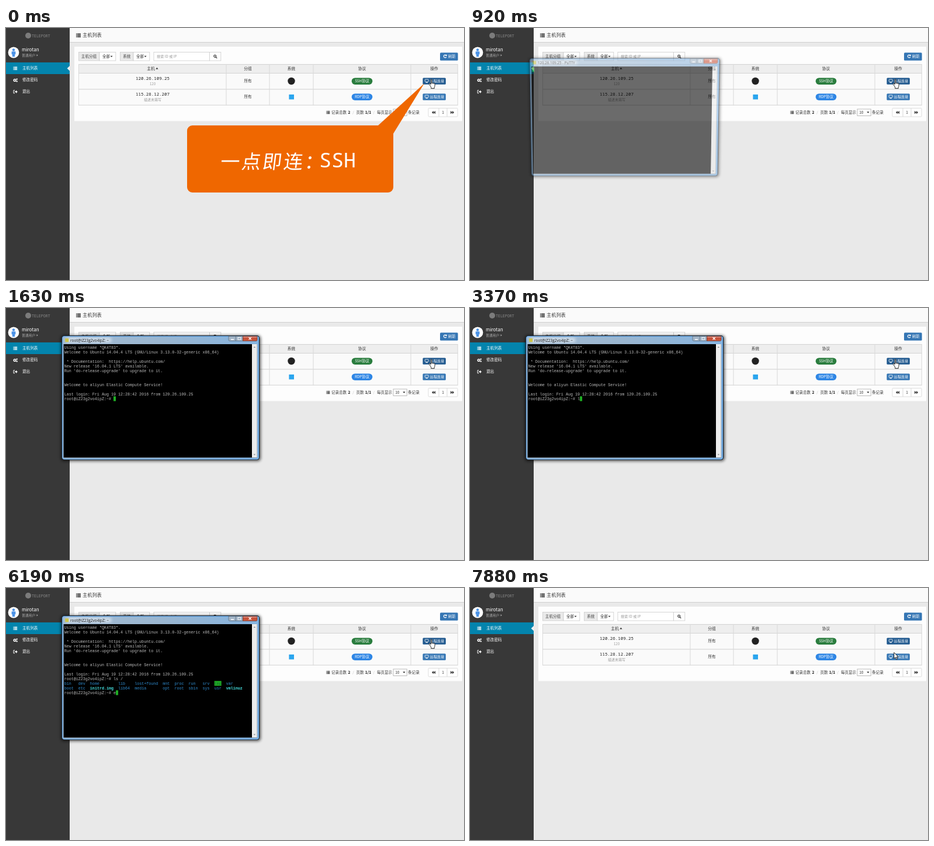
Recreate the animation shown at these times as an HTML page. Size 784 by 432 pixels, loop 8 s.

```html
<!DOCTYPE html>
<html lang="zh">
<head>
<meta charset="utf-8">
<title>Teleport</title>
<style>
html, body { margin: 0; width: 100%; height: 100%; overflow: hidden; background: #e9e9e9; }
svg { position: absolute; inset: 0; width: 100%; height: 100%; }
text { white-space: pre; font-family: "Noto Sans CJK SC", "Noto Sans CJK", "Noto Sans", sans-serif; }
.mono { font-family: "Noto Sans Mono", monospace; }
.term { font-family: "Liberation Mono", monospace; font-size: 6.69px; }
#title { font-family: "Open Sans", sans-serif; }
#win { transform-origin: 33.75% 35.2%; }
</style>
</head>
<body>
<svg id="page" viewBox="0 0 784 432"></svg>
<svg id="win" viewBox="0 0 784 432"></svg>
<svg id="top" viewBox="0 0 784 432"></svg>
<script>
const LOOP = 8000;
const $ = id => document.getElementById(id);
const esc = s => s.replace(/&/g, '&amp;').replace(/</g, '&lt;');

// Shape helpers; y of text is the middle of the line
const box = (x, y, w, h, fill, more = '') =>
  `<rect x="${x}" y="${y}" width="${w}" height="${h}" fill="${fill}" ${more}/>`;
const frame = (x, y, w, h, fill, line, r = 0) =>
  box(x + .5, y + .5, w - 1, h - 1, fill, `stroke="${line}" stroke-width=".8" rx="${r}"`);
const txt = (x, y, size, fill, s, more = '') =>
  `<text x="${x}" y="${y + size * .36}" font-size="${size}" fill="${fill}" ${more}>${esc(s)}</text>`;
const mid = (x, y, size, fill, s, more = '') =>
  txt(x, y, size, fill, s, 'text-anchor="middle" ' + more);
const path = (d, fill, more = '') => `<path d="${d}" fill="${fill}" ${more}/>`;
const line = (d, stroke, w = 1) => path(d, 'none', `stroke="${stroke}" stroke-width="${w}"`);
const dot = (x, y, r, fill) => `<circle cx="${x}" cy="${y}" r="${r}" fill="${fill}"/>`;
const caret = (x, y, fill = '#333') => path(`M${x} ${y}h4l-2 2.3z`, fill);

const listIcon = (x, y, s, fill) => [0, 1, 2, 3].map(i =>
  box(x, y + i * s * .25, s * .2, s * .17, fill) +
  box(x + s * .28, y + i * s * .25, s * .8, s * .17, fill)).join('');

function connectButton(y, fill, id) {
  return box(713.4, y - 5.6, 39.4, 11.4, fill, `rx="1.5" id="${id}"`) +
    frame(716.7, y - 3.4, 7, 5, 'none', '#fff', .6) + box(718.5, y + 2, 3.4, 1, '#fff') +
    txt(725.5, y, 6.2, '#fff', '远程连接', 'font-weight="500"');
}

function sidebar() {
  const item = (y, s) => txt(28, y, 6.6, '#fff', s);
  return box(0, 0, 109, 432, '#383838') +
    dot(38, 13, 5, '#7c7c7c') +
    '<text x="44" y="15.6" font-size="6.6" fill="#8a8a8a" class="mono">TELEPORT</text>' +
    dot(13, 42, 9.4, '#fff') + dot(13, 37.5, 2.2, '#4c93e6') +
    path('M9.6 40.3h6.8v5h-1.2v4h-4.4v-4H9.6z', '#4c93e6') +
    txt(27, 37.2, 8, '#fff', 'mirotan') +
    txt(27, 46.8, 5.8, '#aaa', '普通用户') + path('M52.5 45l2.2 1.8-2.2 1.8z', '#aaa') +
    box(0, 59, 109, 20, '#0384ad') + path('M109 65v8.4l-4.4-4.2z', '#f2f2f2') +
    listIcon(12.5, 66.3, 6.2, '#fff') + item(69, '主机列表') +
    '<circle cx="15" cy="89.5" r="1.8" fill="none" stroke="#fff" stroke-width="1.5"/>' +
    dot(18.6, 87.6, 1.2, '#fff') + dot(18.6, 91.4, 1.2, '#fff') + item(89, '修改密码') +
    line('M15 106.8h-2v5h2', '#fff') + path('M15 108.5h2v-1.8l2.8 2.6-2.8 2.6v-1.8h-2z', '#fff') +
    item(109, '退出');
}

function filters() {
  return frame(124, 41, 36.5, 15.5, '#eaeaea', '#ccc') + mid(142, 48.8, 6.6, '#444', '主机分组') +
    frame(159.5, 41, 28.8, 15.5, '#fff', '#ccc') + txt(165, 48.8, 6.4, '#222', '全部') + caret(178.6, 47.8) +
    frame(195, 41, 23.5, 15.5, '#eaeaea', '#ccc') + mid(206.8, 48.8, 6.6, '#444', '系统') +
    frame(217.5, 41, 28.8, 15.5, '#fff', '#ccc') + txt(223, 48.8, 6.4, '#222', '全部') + caret(236.6, 47.8) +
    frame(252.5, 41, 96.5, 15.5, '#fff', '#ccc') + txt(258, 48.8, 6.2, '#999', '搜索 ID 或 IP') +
    frame(348, 41, 20.3, 15.5, '#fff', '#ccc') +
    '<circle cx="357.7" cy="48.2" r="1.9" fill="none" stroke="#222" stroke-width="1.1"/>' +
    line('M359 49.6l2.2 2.2', '#222', 1.2) +
    box(743, 42.3, 30.6, 13.4, '#3576b4', 'rx="1.5"') +
    line('M753.6 47a2.4 2.4 0 1 0 .2 2.6', '#fff', 1.2) + path('M754.6 45v3h-3z', '#fff') +
    txt(756.8, 49, 6.4, '#fff', '刷新', 'font-weight="500"');
}

function table() {
  const heads = [[248, '主机'], [414, '分组'], [488.5, '系统'], [609.5, '协议'], [733, '操作']];
  const row = (y, ip, note, proto, color) =>
    mid(251, y - 5, 7.43, '#222', ip, 'class="mono"') +
    mid(251, y + 5, 6, '#999', note) + mid(414, y, 6.6, '#333', '所有') +
    box(591.7, y - 5.6, 35.6, 11.6, color, 'rx="5.7"') +
    mid(609.5, y, 6.3, '#fff', proto, 'font-weight="500"');
  return box(124, 62, 649.5, 70.5, '#fafafa') + box(124, 62, 649.5, 15.5, '#eee') +
    heads.map(([x, s]) => mid(x, 69.8, 6.7, '#333', s)).join('') + path('M256.2 70.4h4.4l-2.2-2.6z', '#333') +
    line('M124 62.4H773.5M124 77.6H773.5M124 132.2H773.5', '#d2d2d2') + line('M124 105H773.5', '#dcdcdc', 1.6) +
    line([124.4, 377, 451, 526, 693, 773.2].map(x => `M${x} 62V132.5`).join(''), '#d8d8d8') +
    row(91, '120.26.109.25', '120', 'SSH协议', '#2a7d3e') +
    row(118, '115.28.12.207', '描述未填写', 'RDP协议', '#2e86e5') +
    dot(488.5, 91, 6.2, '#222') + box(484.4, 114, 8.6, 8.4, '#2aa5ee') +
    connectButton(91, '#20598f', 'ssh') + connectButton(118, '#3576b4', 'rdp');
}

function footer() {
  const y = 144.8, ink = '#333';
  const arrows = (x, d) => [0, 3 * d].map(dx => path(`M${x + dx} 142l${3 * d} 2.7l${-3 * d} 2.7z`, ink)).join('');
  return listIcon(548.3, 142.2, 5.6, ink) +
    txt(557, y, 6.5, ink, '记录总数') + txt(585.4, y, 6.5, '#111', '2', 'font-weight="700"') +
    txt(593.2, y, 6.2, '#bbb', '/') + txt(599.6, y, 6.5, ink, '页数') +
    txt(614.8, y, 6.5, '#111', '1/1', 'font-weight="700"') + txt(628.4, y, 6.2, '#bbb', '/') +
    txt(635, y, 6.5, ink, '每页显示') + frame(662.5, 138.5, 24.2, 12.5, '#fff', '#aaa') +
    txt(666.2, y, 6.6, ink, '10') + caret(679.4, 143.6, '#222') + txt(688, y, 6.6, ink, '条记录') +
    frame(722.5, 137, 51, 15.5, '#fff', '#d6d6d6', 1) + line('M741 137.5v14.5M755 137.5v14.5', '#d6d6d6') +
    arrows(735, -1) + arrows(761, 1) + mid(748, y, 6.4, ink, '1');
}

function callout() {
  return '<g id="callout">' +
    path('M319 167H637L716 95 663 181V273a9 9 0 0 1-9 9H319a9 9 0 0 1-9-9V176a9 9 0 0 1 9-9z', '#ef6700') +
    '<text font-size="33" fill="#fff" font-weight="500" letter-spacing="3" transform="translate(366 241) skewX(-7)">一点即连：</text>' +
    '<text x="536" y="239.3" font-size="35" fill="#fff" class="mono">SSH</text></g>';
}

// Terminal
const CW = 4.015, LH = 8, X0 = 99.7, Y0 = 69.6;
const PROMPT = 'root@iZ23g2vo4ipZ:~# ';
const BANNER = [
  'Using username "QK4T83".',
  'Welcome to Ubuntu 14.04.4 LTS (GNU/Linux 3.13.0-32-generic x86_64)', '',
  ' * Documentation:  https://help.ubuntu.com/',
  "New release '16.04.1 LTS' available.",
  "Run 'do-release-upgrade' to upgrade to it.", '', '',
  'Welcome to aliyun Elastic Compute Service!', '',
  'Last login: Fri Aug 19 12:28:42 2016 from 120.26.109.25'];
const COLS = [0, 6, 11, 23, 30, 42, 47, 53, 59, 64, 69];
const DIRS = ['bin dev home lib lost+found mnt proc run srv tmp var',
  'boot etc initrd.img lib64 media opt root sbin sys usr vmlinuz'];

const put = (col, row, s, fill = '#bdbdbd', more = '') =>
  `<text class="term" x="${X0 + col * CW}" y="${Y0 + row * LH}" fill="${fill}" ${more}>${esc(s)}</text>`;
const block = (col, row, n = 1) =>
  box(X0 + col * CW, Y0 + row * LH - 6.2, n * CW, LH + .2, '#1fae24');

const listing = row => DIRS[row].split(' ').map((s, i) => {
  const at = [COLS[i], 12 + row, s];
  if (s === 'tmp') return block(at[0], at[1], 3) + put(...at, '#17642a');
  return /img|vml/.test(s) ? put(...at, '#45e0e0', 'font-weight="700"') : put(...at, '#2f8ccf');
}).join('');

const step = (t, list) => list.reduce((v, [at, next]) => t >= at ? next : v, list[0][1]);
const typed = (t, list) => step(t, [[0, ''], ...list]);

function screen(t) {
  if (t < 1630) return block(0, 0);
  const cmd = typed(t, [[3370, 'l'], [3500, 'ls'], [3780, 'ls /']]);
  let out = BANNER.map((s, i) => put(0, i, s)).join('') + put(0, 11, PROMPT + cmd);
  let cur = [PROMPT.length + cmd.length, 11];
  if (t >= 4340) { out += listing(0); cur = [0, 13]; }
  if (t >= 4490) { out += listing(1); cur = [0, 14]; }
  if (t >= 4640) {
    const last = typed(t, [[6190, 'e'], [6310, 'ex'], [6560, 'exi'], [6830, 'exit']]);
    out += put(0, 14, PROMPT + last);
    cur = [PROMPT.length + last.length, 14];
  }
  return out + block(...cur);
}

function windowFrame() {
  return `<defs><linearGradient id="glass"><stop offset="0" stop-color="#a3bbd2"/>
    <stop offset=".5" stop-color="#9ab6d0"/><stop offset="1" stop-color="#86b4e0"/></linearGradient>
    <linearGradient id="red" x2="0" y2="1"><stop offset="0" stop-color="#e0a093"/>
    <stop offset=".5" stop-color="#c4472f"/><stop offset="1" stop-color="#d0674c"/></linearGradient>
    <filter id="blur" x="-10%" y="-20%" width="120%" height="140%"><feGaussianBlur stdDeviation="2.8"/></filter></defs>` +
    box(94, 47, 342, 215.5, '#000', 'rx="5" opacity=".65" filter="url(#blur)"') +
    box(95.7, 47.7, 337.8, 212.3, 'url(#glass)', 'rx="4" stroke="#17222e" stroke-width="1.2"') +
    box(96.9, 48.9, 335.4, 209.9, 'none', 'rx="3" stroke="#6fb0ee" stroke-width="1.2"') +
    box(104, 51, 76, 8, '#e6eef6', 'opacity=".75" filter="url(#blur)"') +
    box(98.6, 62, 331.2, 194.4, '#000') + box(421, 62, 8.8, 194.4, '#ececec') +
    path('M423.6 68h3.6l-1.8-2z', '#888') + path('M423.6 250.5h3.6l-1.8 2z', '#888') +
    box(101.2, 52.2, 6, 6, '#cfc64a') + txt(110, 55.3, 6.5, '#111', '', 'id="title"') +
    path('M381 48.3h24.5v8.2H383a2 2 0 0 1-2-2z', '#a2b4c6', 'stroke="#55697c" stroke-width=".7"') +
    path('M405.5 48.3H430v6.2a2 2 0 0 1-2 2h-22.5z', 'url(#red)', 'stroke="#6b2a20" stroke-width=".7"') +
    line('M393.3 48.3v8.2', '#55697c', .7) + line('M385 54h5', '#fff', 1.5) +
    frame(396.6, 50, 5.6, 4.8, 'none', '#fff') + line('M415.6 50.2l4.2 4.2m0-4.2l-4.2 4.2', '#fff', 1.3) +
    '<g id="screen"></g>';
}

$('page').innerHTML = box(109, 0, 675, 432, '#e9e9e9') + box(109, 0, 675, 24, '#fafafa') +
  box(109, 24, 675, 1, '#cfcfcf') + sidebar() +
  listIcon(120, 9.2, 7.4, '#333') + txt(131, 12.3, 8.2, '#333', '主机列表') +
  box(117, 32, 664, 127.5, '#fdfdfd') + filters() + table() + footer();
$('win').innerHTML = windowFrame();
const outline = 'stroke="#111" stroke-width=".9" stroke-linejoin="round"';
$('top').innerHTML = callout() +
  path('M727.3 88.6v8l-1.8-1.5c-1-.6-1.8.4-1 1.3l3.2 5.2v2h5.5v-2.2c1-1.4 1-3 .9-5.8-.2-1-1.3-1-1.5-.2 0-1.2-1.6-1.3-1.8-.2-.1-1.2-1.6-1.3-1.8-.2v-6.4c-.1-1.2-1.6-1.2-1.7 0z', '#fff', outline + ' id="hand"') +
  path('M725.8 110.5v10.5l2.4-2.2 1.7 3.8 1.7-.8-1.7-3.6h3.4z', '#fff', outline + ' id="arrow"');

const show = (id, on) => $(id).style.display = on ? '' : 'none';
let shown = '';

function draw(t) {
  $('callout').setAttribute('opacity', step(t, [[0, 1], [500, .45], [630, 0]]));
  $('ssh').setAttribute('fill', step(t, [[0, '#20598f'], [630, '#1b4a78'], [770, '#20598f']]));
  show('hand', t < 7880);
  show('arrow', t >= 7880);

  // scale, tilt in degrees, opacity
  const [scale, tilt, alpha] = step(t, [[0, [1, 0, 0]], [920, [.953, -6, .58]], [1070, [.99, -1, .95]],
    [1200, [1, 0, 1]], [7580, [.99, -1, 1]], [7730, [.95, -6, .45]], [7880, [1, 0, 0]]]);
  show('win', alpha > 0);
  $('win').style.opacity = alpha;
  $('win').style.transform = scale < 1 ? `perspective(1000px) rotateX(${tilt}deg) scale(${scale})` : 'none';
  $('title').textContent = t < 1630 ? '120.26.109.25 - PuTTY' : 'root@iZ23g2vo4ipZ: ~';
  const now = screen(t);
  if (now !== shown) $('screen').innerHTML = shown = now;
}

const start = performance.now();
function tick() {
  draw((performance.now() - start) % LOOP);
  requestAnimationFrame(tick);
}
tick();
</script>
</body>
</html>
```
